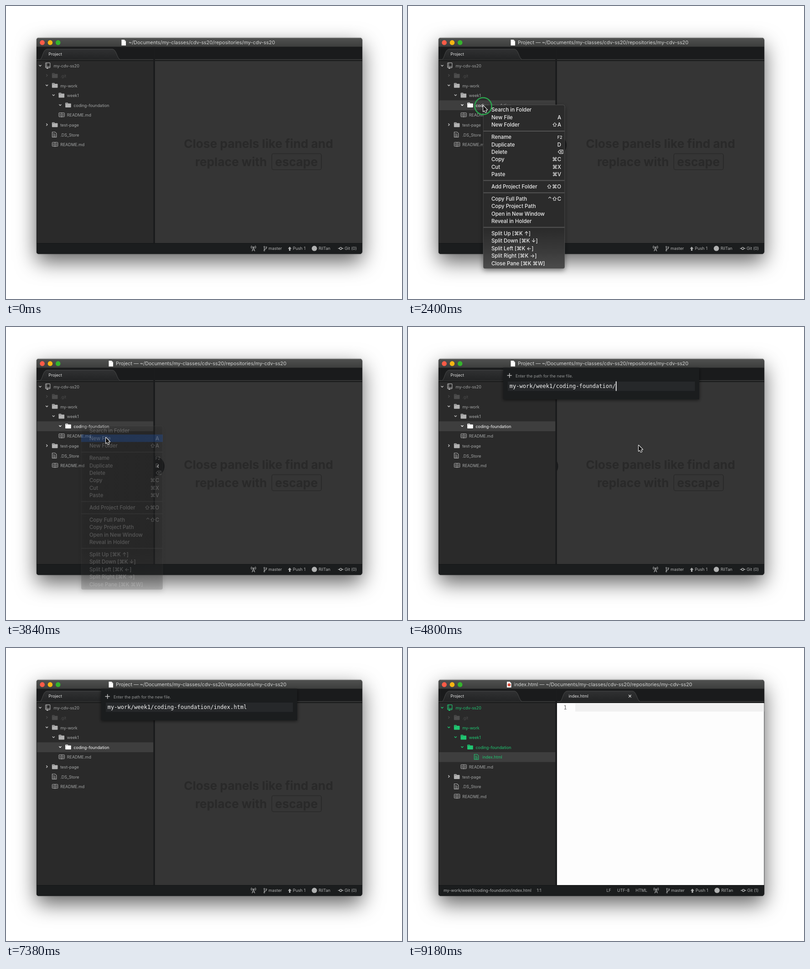
An HTML page with a canvas for the animation above (9480 ms loop, 869x644 px).

```html
<!DOCTYPE html>
<html lang="en">
<head>
<meta charset="utf-8">
<title>New file in the editor</title>
<style>
html, body { margin: 0; width: 100%; height: 100%; overflow: hidden; background: #fff; }
canvas { display: block; width: 869px; height: 644px; }
</style>
</head>
<body>
<canvas id="stage"></canvas>
<script>
const W = 869, H = 644, LOOP = 9480;
const canvas = document.getElementById('stage');
const dpr = window.devicePixelRatio || 1;
canvas.width = W * dpr;
canvas.height = H * dpr;
const c = canvas.getContext('2d');

const UI = 'Inter, "DejaVu Sans", sans-serif';
const MONO = '"DejaVu Sans Mono", monospace';
const BAR = '#1b1d1e', TREE = '#2a2a2a', PANE = '#353535';
const GREY = '#a4a6a6', ICON = '#b2b2b2', DIM = '#4c4c4c', GREEN = '#20c671';
const ROOT = '~/Documents/my-classes/cdv-ss20/repositories/my-cdv-ss20';
const FOLDER = 'my-work/week1/coding-foundation/', FILE = 'index.html';

// Moments of the story, in ms
const T = {
  enter: 60, select: 1980, menu: 2040, menuFade: 3660, menuEnd: 3900,
  dialog: 3960, dockHide: 4650, type: 5240, key: 150, blink: 7100,
  close: 7500, green: 7620, open: 7740, caretOff: 8940
};
const PATH = [
  [60, 853, 569], [960, 176, 204], [1260, 169, 194], [1500, 169, 194],
  [1860, 165, 219], [2700, 165, 219], [3240, 219, 243], [4080, 219, 243], [4740, 506, 260]
];
const MENU = [
  [228, 'Search in Folder', ''], [244.5, 'New File', 'A'], [261, 'New Folder', '⇧A'],
  [288, 'Rename', 'F2'], [304.4, 'Duplicate', 'D'], [320.8, 'Delete', '⌫'],
  [337.2, 'Copy', '⌘C'], [353.6, 'Cut', '⌘X'], [370, 'Paste', '⌘V'],
  [397, 'Add Project Folder', '⇧⌘O'],
  [423.5, 'Copy Full Path', '⌃⇧C'], [440, 'Copy Project Path', ''],
  [456.5, 'Open in New Window', ''], [473, 'Reveal in Holder', ''],
  [499.5, 'Split Up [⌘K ↑]', ''], [516, 'Split Down [⌘K ↓]', ''],
  [532.5, 'Split Left [⌘K ←]', ''], [549, 'Split Right [⌘K →]', ''],
  [565.5, 'Close Pane [⌘K ⌘W]', '']
];
const SEPARATORS = [275, 383.5, 410.5, 486.5];

const clamp = v => Math.max(0, Math.min(1, v));
const ramp = (t, a, b) => clamp((t - a) / (b - a));
const ease = u => u * u * (3 - 2 * u);

function rect(x, y, w, h, fill) {
  c.fillStyle = fill;
  c.fillRect(x, y, w, h);
}
function text(s, x, y, color, size = 8.95, weight = 400, align = 'left', family = UI) {
  c.font = `${weight} ${size}px ${family}`;
  c.textAlign = align;
  c.fillStyle = color;
  c.fillText(s, x, y);
}
function line(points, color, width = 1, close = false) {
  c.beginPath();
  points.forEach(([x, y]) => c.lineTo(x, y));
  if (close) c.closePath();
  c.strokeStyle = color;
  c.lineWidth = width;
  c.stroke();
}
function disc(x, y, r, fill) {
  c.beginPath();
  c.arc(x, y, r, 0, 7);
  c.fillStyle = fill;
  c.fill();
}
function arc(x, y, r, a, b, color, width = 1) {
  c.beginPath();
  c.arc(x, y, r, a, b);
  c.strokeStyle = color;
  c.lineWidth = width;
  c.stroke();
}
function box(x, y, w, h, r) {
  c.beginPath();
  c.roundRect(x, y, w, h, r);
}
function shadow(color, blur, dy) {
  c.shadowColor = color;
  c.shadowBlur = blur * dpr;
  c.shadowOffsetY = dy * dpr;
}
function gradient(y0, y1, ...stops) {
  const g = c.createLinearGradient(0, y0, 0, y1);
  stops.forEach(([at, color]) => g.addColorStop(at, color));
  return g;
}

function pointer(t) {
  let i = 0;
  while (i < PATH.length - 2 && t >= PATH[i + 1][0]) i++;
  const [t0, x0, y0] = PATH[i], [t1, x1, y1] = PATH[i + 1];
  const u = ease(ramp(t, t0, t1));
  return [x0 + (x1 - x0) * u, y0 + (y1 - y0) * u];
}

const icons = {
  folder(x, y, color) {
    c.fillStyle = color;
    box(x, y - 5.3, 6, 4, 1);
    c.fill();
    box(x, y - 3.6, 12.6, 8.9, 1);
    c.fill();
    rect(x + 1, y - 3.7, 4.2, 0.9, 'rgba(40,40,40,.6)');
  },
  repo(x, y, color) {
    c.strokeStyle = color;
    c.lineWidth = 1.2;
    box(x + 0.6, y - 6.5, 10, 10.8, 1);
    c.stroke();
    line([[x + 3, y - 6], [x + 3, y + 1.5]], color, 1);
    line([[x + 1, y + 1.8], [x + 10.5, y + 1.8]], color, 1);
    rect(x + 3, y + 3.5, 3.2, 3.2, color);
  },
  book(x, y, color) {
    c.strokeStyle = color;
    c.lineWidth = 1;
    box(x + 0.5, y - 4.7, 12.4, 8.9, 1);
    c.stroke();
    line([[x + 6.7, y - 4.5], [x + 6.7, y + 5.4]], color, 1);
    for (let k = -2; k < 3; k += 2) {
      line([[x + 2, y + k], [x + 5.3, y + k]], color, 0.8);
      line([[x + 8.1, y + k], [x + 11.4, y + k]], color, 0.8);
    }
  },
  file(x, y, color) {
    line([[x + 0.6, y - 5.7], [x + 6.8, y - 5.7], [x + 9.9, y - 2.7], [x + 9.9, y + 5.6], [x + 0.6, y + 5.6]], color, 1.1, true);
    for (let k = -2; k < 5; k += 2.2) {
      line([[x + 2.4, y + k], [x + (k < -1 ? 6 : 8), y + k]], color, 0.9);
    }
  }
};

function chevron(x, y, dir, color) {
  const d = 2.5, h = 1.3;
  const shape = {
    down: [[x - d, y - h], [x, y + h], [x + d, y - h]],
    right: [[x - h, y - d], [x + h, y], [x - h, y + d]],
    left: [[x + h, y - d - 0.8], [x - h - 0.5, y], [x + h, y + d + 0.8]]
  };
  line(shape[dir], color, 1.3);
}

function tab(x, w, label, active) {
  c.beginPath();
  c.moveTo(x, 117.5);
  c.bezierCurveTo(x + 5, 116, x + 6, 95, x + 15, 94.8);
  c.lineTo(x + w - 16, 94.8);
  c.bezierCurveTo(x + w - 8, 95, x + w - 6, 116, x + w, 117.5);
  c.fillStyle = gradient(95, 118, [0, '#303132'], [1, '#222324']);
  c.fill();
  c.strokeStyle = '#484949';
  c.lineWidth = 1;
  c.stroke();
  text(label, x + 18.3, 108.7, '#e2e2e2');
  if (active) {
    const mx = x + 153, my = 105.8, d = 2.8;
    line([[mx - d, my - d], [mx + d, my + d]], '#ddd', 1.2);
    line([[mx + d, my - d], [mx - d, my + d]], '#ddd', 1.2);
  }
}

function frame() {
  c.save();
  shadow('rgba(0,0,0,.62)', 46, 17);
  c.fillStyle = BAR;
  box(67, 70, 714.5, 475, 5);
  c.fill();
  shadow('rgba(0,0,0,.4)', 3, 0);
  c.fill();
  c.restore();
}

function titleBar(t) {
  rect(67, 70, 715, 19.5, gradient(70, 89, [0, '#505150'], [1, '#3d3e3d']));
  rect(67, 70, 715, 1, 'rgba(255,255,255,.16)');
  ['#fc5b47', '#f5b512', '#35b42c'].forEach((color, i) => disc(79.6 + i * 17.3, 80.4, 5.3, color));
  const opened = t >= T.green;
  const x = opened ? 232.5 : t >= T.select ? 241 : 269;
  const prefix = opened ? FILE + ' — ' : t >= T.select ? 'Project — ' : '';
  text(prefix + ROOT, x, 84.4, '#d4d5d4', 10.87);
  const ix = x - 15.5;
  c.beginPath();
  [[0, 0], [6.3, 0], [9.6, 3.4], [9.6, 12.8], [0, 12.8]].forEach(([a, b]) => c.lineTo(ix + a, 74 + b));
  c.fillStyle = '#fff';
  c.fill();
  if (opened) disc(ix + 4.9, 81, 3.3, '#d94f3d');
  else line([[ix + 6.3, 74], [ix + 6.3, 77.4], [ix + 9.6, 77.4]], '#bbb', 0.7);
}

function treeRows(t) {
  const green = t >= T.green;
  const rows = [
    [0, 'repo', 'my-cdv-ss20', 'down', green],
    [1, 'folder', '.git', 'right'],
    [1, 'folder', 'my-work', 'down', green],
    [2, 'folder', 'week1', 'down', green],
    [3, 'folder', 'coding-foundation', 'down', green],
    [2, 'book', 'README.md'],
    [1, 'folder', 'test-page', 'right'],
    [1, 'file', '.DS_Store'],
    [1, 'book', 'README.md']
  ];
  if (green) rows.splice(5, 0, [4, 'file', FILE, '', true]);
  return rows;
}

function tree(t) {
  rect(68, 121, 255.5, 400, TREE);
  const selected = t >= T.open ? 5 : t >= T.select ? 4 : -1;
  if (selected > 0) rect(68, 207.4 + (selected - 4) * 21.6, 255.5, 21.6, '#3e3e3e');
  treeRows(t).forEach(([level, icon, label, dir, green], i) => {
    const y = 131.8 + i * 21.62;
    const dim = label === '.git', white = i === selected && !green;
    const pick = normal => green ? GREEN : dim ? DIM : white ? '#fff' : normal;
    const x = level * 14.65;
    if (dir) chevron(75 + x, y - 0.8, dir, pick('#c6c6c6'));
    icons[icon](86.2 + x, y - 0.5, pick(ICON));
    text(label, 104.5 + x, y + 3.5, pick(GREY));
  });
}

function hint() {
  const color = '#292929';
  text('Close panels like find and', 554, 311.5, color, 26.3, 700, 'center');
  text('replace with', 415, 352, color, 26.3, 700);
  text('escape', 637.3, 352, color, 26.3, 700, 'center');
  c.strokeStyle = color;
  c.lineWidth = 1.6;
  box(583.3, 324.5, 108.8, 35.3, 4);
  c.stroke();
}

function editor(t) {
  const opened = t >= T.open;
  rect(323.5, 89.5, 3.5, 432, '#1b1c1d');
  rect(327, 121, 454.5, 400, opened ? '#fdfdfd' : PANE);
  if (!opened) return hint();
  rect(367, 122, 414.5, 17.6, '#f1f1f1');
  text('1', 348.5, 135, '#6a6a6a', 12.2, 400, 'right', MONO);
  if (t < T.caretOff && (t - T.open) % 800 < 400) rect(367.2, 121.5, 1.6, 18.5, '#222');
}

function tabBars(t) {
  rect(67, 89.5, 715, 32, '#1a1b1c');
  rect(67, 118, 715, 3, '#222323');
  rect(67, 117, 256.5, 1, '#434444');
  rect(327, 117, 455, 1, '#434444');
  rect(67, 120.2, 715, 1, '#151616');
  tab(75, 175, 'Project', false);
  if (t >= T.open) tab(334, 175, FILE, true);
}

function statusBar(t) {
  const opened = t >= T.open, s = opened ? 1.5 : 0, color = '#b0b1b1', base = 536.4;
  rect(67, 521, 715, 24.5, BAR);
  rect(67, 521, 715, 1, '#141516');
  if (opened) {
    text(FOLDER + FILE, 78, base, color, 8.85);
    text('1:1', 282.5, base, color);
    text('LF', 435.5, base, color);
    text('UTF-8', 459, base, color);
    text('HTML', 499.5, base, color);
  }
  const ax = 543 + s;
  line([[ax - 3, 539], [ax, 530.5], [ax + 3, 539]], color, 1.1);
  line([[ax - 2, 536.3], [ax + 2, 536.3]], color, 0.9);
  disc(ax, 530, 1.2, color);
  [3, 5.3].forEach(r => {
    arc(ax, 530, r, -0.7, 0.7, color);
    arc(ax, 530, r, Math.PI - 0.7, Math.PI + 0.7, color);
  });
  const bx = 566.8 + s;
  line([[bx, 530], [bx, 537]], color, 1.2);
  line([[bx + 4.5, 531], [bx + 4.5, 533], [bx, 535.5]], color, 1.2);
  [[0, 529.3], [4.5, 530.3], [0, 537.5]].forEach(([dx, y]) => arc(bx + dx, y, 1.2, 0, 7, color));
  text('master', 576 + s, base, color, 9.05);
  const px = 622.6 + s;
  c.beginPath();
  [[0, 529], [4, 533.5], [1.6, 533.5], [1.6, 538], [-1.6, 538], [-1.6, 533.5], [-4, 533.5]]
    .forEach(([dx, y]) => c.lineTo(px + dx, y));
  c.fillStyle = color;
  c.fill();
  text('Push 1', 629.6 + s, base, color, 9.1);
  disc(676.7 + s, 532.8, 5.8, color);
  text('RilTan', 686 + s, base, color, 9.1);
  const gx = 734.5 + s;
  arc(gx, 532.8, 2.4, 0, 7, color, 1.4);
  line([[gx - 5.8, 532.8], [gx - 2.6, 532.8]], color, 1.4);
  line([[gx + 2.6, 532.8], [gx + 5.8, 532.8]], color, 1.4);
  text(opened ? 'Git (1)' : 'Git (0)', 743 + s, base, color, 9.05);
}

function dockToggle(t) {
  const out = ramp(t, 720, 900) * (1 - ramp(t, T.dockHide, 4830));
  if (!out) return;
  const x = 304 + 22 * out;
  c.save();
  c.beginPath();
  c.rect(326, 270, 40, 70);
  c.clip();
  disc(x, 306, 22, '#1a1b1c');
  chevron(x + 7.6, 306, 'left', '#e6e6e6');
  c.restore();
}

function dialog(t) {
  if (t < T.dialog || t >= T.close) return;
  c.save();
  shadow('rgba(0,0,0,.6)', 7, 2);
  rect(209, 89.5, 430, 69.5, BAR);
  c.restore();
  line([[222.7, 101.5], [222.7, 111.7]], '#c4c4c4', 1.5);
  line([[217.6, 106.6], [227.8, 106.6]], '#c4c4c4', 1.5);
  text('Enter the path for the new file.', 236, 111.3, '#949696', 8.82);
  rect(219, 120, 410.5, 20.5, '#26282a');
  const count = Math.max(0, Math.min(FILE.length, Math.floor((t - T.type) / T.key) + 1));
  const value = FOLDER + FILE.slice(0, count);
  text(value, 222.7, 134.2, '#f4f4f4', 12.1, 400, 'left', MONO);
  const on = t < T.type ? (t - T.dialog) % 800 < 400 : t < T.blink;
  if (on) rect(222.9 + c.measureText(value).width, 119.5, 1.7, 21, '#fff');
}

function menu(t, py) {
  if (t < T.menu || t >= T.menuEnd) return;
  c.save();
  c.globalAlpha = 1 - ramp(t, T.menuFade, T.menuEnd);
  c.save();
  shadow('rgba(0,0,0,.45)', 12, 4);
  c.fillStyle = gradient(217, 577, [0, '#2b2b2b'], [0.76, '#2b2b2b'], [0.88, '#383838'], [1, '#4b4b4b']);
  box(165, 217.3, 179, 360, 4);
  c.fill();
  c.restore();
  c.strokeStyle = 'rgba(255,255,255,.2)';
  c.lineWidth = 0.8;
  c.stroke();
  SEPARATORS.forEach(y => rect(165.5, y - 0.9, 178, 1.8, '#575757'));
  MENU.forEach(([y, label, keys]) => {
    if (Math.abs(py - y) < 8.2) rect(165, y - 8.2, 179, 16.4, '#1a62d8');
    text(label, 183, y + 4.2, '#f0f0f0', 11.4, 500);
    if (keys === 'F2') text(keys, 338.5, y + 3.7, '#f0f0f0', 9, 500, 'right');
    else text(keys, keys === '⌫' ? 341.5 : 336, y + 4.2, '#f0f0f0', 11.4, 500, 'right');
  });
  c.restore();
}

function clickRing(t, x, y, from, to) {
  const alpha = ramp(t, from, from + 100) * (1 - ramp(t, to, to + 150));
  if (!alpha) return;
  c.save();
  c.globalAlpha = alpha;
  arc(x, y + 1, 12 + 6.5 * ramp(t, from, from + 120), 0, 7, '#2ba44d', 2.5);
  c.restore();
}

function arrow(x, y) {
  c.save();
  c.translate(x, y);
  c.lineJoin = 'round';
  c.beginPath();
  [[0, 0], [0, 12.8], [2.9, 10.2], [4.9, 14.9], [7.1, 14], [5.1, 9.4], [9, 9.2]].forEach(([a, b]) => c.lineTo(a, b));
  c.closePath();
  c.fillStyle = '#111';
  c.strokeStyle = '#fff';
  c.lineWidth = 2;
  c.stroke();
  c.fill();
  c.restore();
}

function draw(t) {
  c.setTransform(dpr, 0, 0, dpr, 0, 0);
  rect(0, 0, W, H, '#fff');
  frame();
  c.save();
  box(67, 70, 714.5, 475, 5);
  c.clip();
  tabBars(t);
  titleBar(t);
  tree(t);
  editor(t);
  dockToggle(t);
  statusBar(t);
  dialog(t);
  c.restore();
  const [x, y] = pointer(t);
  menu(t, y);
  clickRing(t, x, y, 1890, 2520);
  clickRing(t, x, y, 3360, 3600);
  if (t >= T.enter && t < T.type) arrow(x, y);
}

function tick() {
  draw(performance.now() % LOOP);
  requestAnimationFrame(tick);
}
tick();
</script>
</body>
</html>
```
